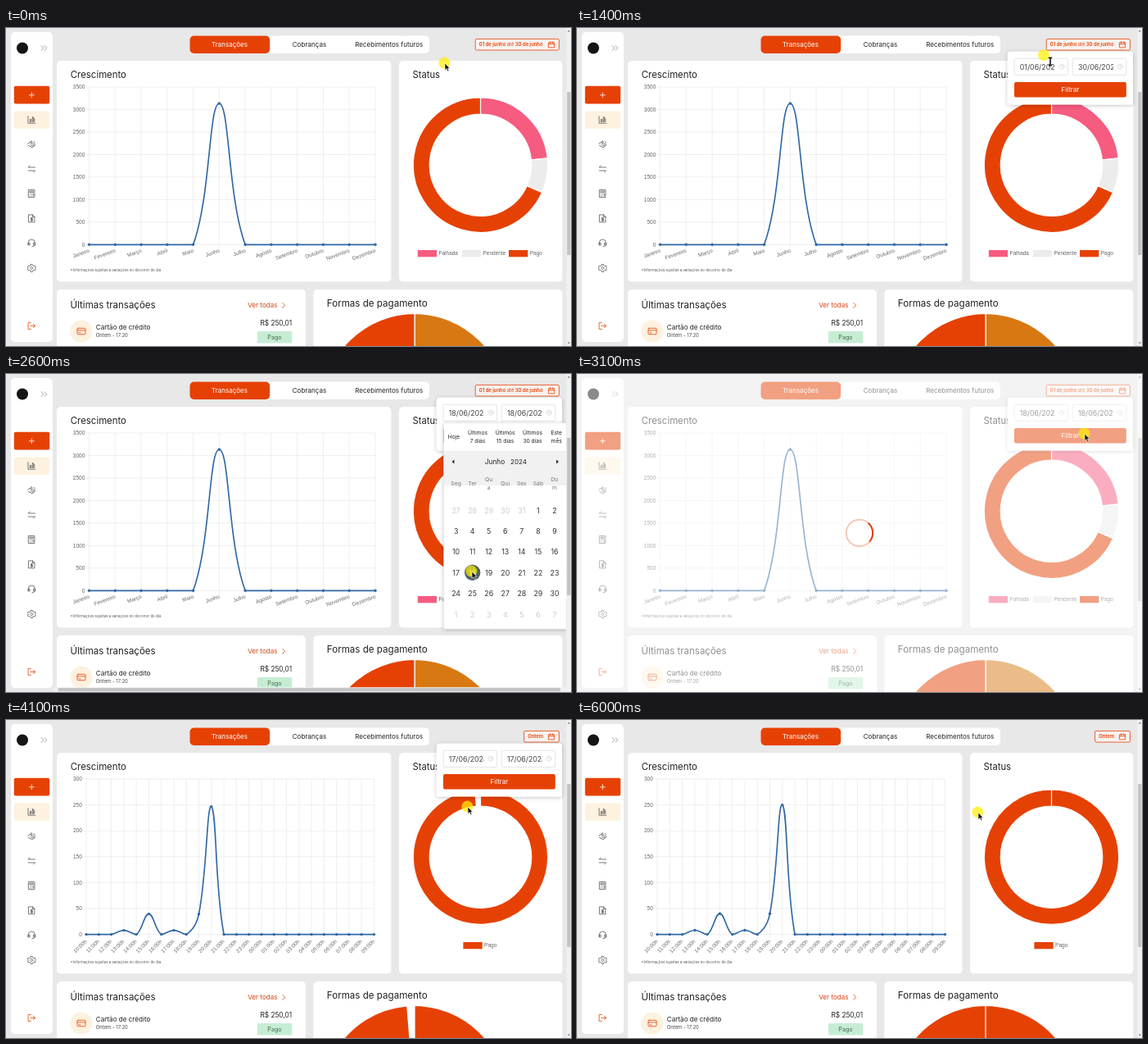
Write an HTML page that moves like this. It is 690 px wide and 388 px high and loops after 6.4 s.

```html
<!DOCTYPE html>
<html lang="pt-BR">
<head>
<meta charset="utf-8">
<title>Painel</title>
<style>
html, body { margin: 0; width: 100%; height: 100%; overflow: hidden; background: #e8e8e8; }
svg { display: block; width: 100vw; height: 100vh; font-family: Inter, sans-serif; }
.chart text { font: 6.5px "Liberation Sans", Arial, sans-serif; fill: #666; }
.icon { fill: none; stroke: #565656; stroke-width: .8; stroke-linecap: round; stroke-linejoin: round; }
.grid { fill: none; stroke: #e4e4e4; stroke-width: .6; }
.line { fill: none; stroke: #3168a5; stroke-width: 1.65; stroke-linejoin: round; }
</style>
</head>
<body>
<svg id="stage" viewBox="0 0 690 388"></svg>
<script>
const LOOP = 6400, STEP = 100;
const ORANGE = '#e64104', DARK = '#222', CREAM = '#fdf1df';

// ---------- drawing helpers ----------
const box = (x, y, x2, y2, fill, r = 0, more = '') =>
  `<rect x="${x}" y="${y}" width="${x2 - x}" height="${y2 - y}" rx="${r}" fill="${fill}" ${more}/>`;
const text = (x, y, size, str, fill = DARK, anchor = 'start', more = '') =>
  `<text x="${x}" y="${y}" font-size="${size}" fill="${fill}" text-anchor="${anchor}" ${more}>${str}</text>`;
const circle = (x, y, r, fill, more = '') => `<circle cx="${x}" cy="${y}" r="${r}" fill="${fill}" ${more}/>`;
const group = (id, body, more = '') => `<g id="${id}" ${more}>${body}</g>`;
const icon = (x, y, d, color = '#565656') =>
  `<path class="icon" transform="translate(${x} ${y})" style="stroke:${color}" d="${d}"/>`;
const at = id => document.getElementById(id);
const show = (id, on) => { at(id).style.display = on ? '' : 'none'; };

function slice(cx, cy, inner, outer, from, to) {
  const end = Math.min(to, from + .99999), big = end - from > .5 ? 1 : 0;
  const pt = (r, f) => {
    const a = (f - .25) * 2 * Math.PI;
    return `${(cx + r * Math.cos(a)).toFixed(3)} ${(cy + r * Math.sin(a)).toFixed(3)}`;
  };
  const back = inner ? `L${pt(inner, end)}A${inner} ${inner} 0 ${big} 0 ${pt(inner, from)}` : `L${cx} ${cy}`;
  return `M${pt(outer, from)}A${outer} ${outer} 0 ${big} 1 ${pt(outer, end)}${back}Z`;
}
const ringPath = (from, to) => slice(579.5, 167.2, 62.2, 82.2, from, to);
const piePath = (from, to) => slice(499, 461, 0, 112.5, from, to);
const wedge = (d, fill, id = '') => `<path id="${id}" d="${d}" fill="${fill}" stroke="#fff" stroke-width="1.2"/>`;

// Smooth curve through points, handles kept inside the plot area.
function spline(pts, top, bottom) {
  const clamp = y => Math.max(top, Math.min(bottom, y));
  const handles = pts.map((p, i) => {
    const a = pts[i - 1] || p, b = pts[i + 1] || p;
    const da = Math.hypot(p[0] - a[0], p[1] - a[1]), db = Math.hypot(b[0] - p[0], b[1] - p[1]);
    const ka = .4 * da / (da + db), kb = .4 * db / (da + db);
    const dx = b[0] - a[0], dy = b[1] - a[1];
    return [[p[0] - ka * dx, clamp(p[1] - ka * dy)], [p[0] + kb * dx, clamp(p[1] + kb * dy)]];
  });
  return pts.map((p, i) => i ? `C${handles[i - 1][1]} ${handles[i][0]} ${p}` : `M${p}`).join('');
}

// ---------- line charts ----------
const pad = n => String(n).padStart(2, '0');
const year = {
  left: 101.5, right: 451, top: 72, bottom: 264.3, max: 3500, tick: 500, tilt: -20,
  labels: ['Janeiro', 'Fevereiro', 'Março', 'Abril', 'Maio', 'Junho', 'Julho', 'Agosto',
    'Setembro', 'Outubro', 'Novembro', 'Dezembro'],
  values: [0, 0, 0, 0, 0, 3135, 0, 0, 0, 0, 0, 0]
};
const day = {
  left: 98, right: 449.5, top: 72, bottom: 261.6, max: 300, tick: 50, tilt: -45,
  labels: Array.from({ length: 24 }, (_, i) => pad((i + 10) % 24) + ':00h'),
  values: Array.from({ length: 24 }, (_, i) => ({ 3: 8, 5: 40, 7: 8, 9: 40, 10: 250 })[i] || 0)
};
const chartX = (c, i) => c.left + (c.right - c.left) * i / (c.labels.length - 1);
const chartY = (c, v) => c.bottom - (c.bottom - c.top) * v / c.max;
const chartPoints = (c, k) => c.values.map((v, i) => [+chartX(c, i).toFixed(2), +chartY(c, v * k).toFixed(2)]);

function axes(c) {
  let grid = '', labels = '';
  for (let v = 0; v <= c.max; v += c.tick) {
    const y = chartY(c, v);
    grid += `M${c.left - 4} ${y}H${c.right}`;
    labels += text(c.left - 5.2, y + 2.2, 6.5, v, '#666', 'end');
  }
  c.labels.forEach((name, i) => {
    const x = chartX(c, i);
    grid += `M${x} ${c.top}V${c.bottom + 4}`;
    labels += `<text text-anchor="end" transform="translate(${x + 1} ${c.bottom + 9}) rotate(${c.tilt})">${name}</text>`;
  });
  return `<path class="grid" d="${grid}"/>${labels}`;
}
const lineChart = (c, id) => axes(c) + `<path id="${id}Line" class="line"/>` +
  group(id + 'Dots', c.labels.map(() => circle(0, 0, 1.7, '#3168a5')).join(''));

function drawLine(c, id, k) {
  const pts = chartPoints(c, k), dots = at(id + 'Dots').children;
  at(id + 'Line').setAttribute('d', spline(pts, c.top, c.bottom));
  pts.forEach(([x, y], i) => { dots[i].setAttribute('cx', x); dots[i].setAttribute('cy', y); });
}

const legend = (x, name, color) => box(x, 271, x + 23.3, 279.3, color) + text(x + 25.7, 277.4, 6.5, name);

const monthView = lineChart(year, 'year') +
  wedge(ringPath(0, .234), '#f65b80') + wedge(ringPath(.234, .317), '#ececec') + wedge(ringPath(.317, 1), ORANGE) +
  legend(502.8, 'Falhada', '#f65b80') + legend(556.8, 'Pendente', '#ececec') + legend(614, 'Pago', ORANGE) +
  wedge(piePath(0, .5), '#d87813') + wedge(piePath(.5, 1), ORANGE);
const dayView = lineChart(day, 'day') + wedge('', ORANGE, 'ring') + wedge('', ORANGE, 'pie') +
  legend(558.4, 'Pago', ORANGE);

// ---------- page ----------
const calIcon = icon(666.2, 20.4, 'M-3.4 -2.6H3.4V3.4H-3.4ZM-3.4 -.5H3.4M-1.7 -3.7V-1.8M1.7 -3.7V-1.8', ORANGE);
const pill = (x, label) => box(x, 13.4, 675.4, 27, '#f7f3f1', 1.5, `stroke="${ORANGE}" stroke-width=".8"`) +
  text(x + 4.6, 22.3, 5.9, label, ORANGE, 'start', 'font-weight="600"') + calIcon;

const sidebar = box(6, 5, 57, 383, '#fff', 5) +
  circle(20, 24.5, 7, '#151515') +
  icon(46.5, 24.5, 'M-3.4 -2.8L-.6 0L-3.4 2.8M.6 -2.8L3.4 0L.6 2.8', '#888') +
  box(9.8, 70.8, 53.2, 92.6, ORANGE, 2) + icon(31.3, 81.8, 'M-3 0H3M0 -3V3', '#fff') +
  box(9.8, 101.4, 53.2, 122.8, CREAM, 2) +
  icon(31.3, 112, 'M-4.3 -4.3V4.2H4.5M-2 2.2V-.5H-.6V2.2ZM.9 2.2V-3.4H2V2.2ZM3.4 2.2V-1.8') +
  icon(31.3, 142, 'M-4.5 -1L-1.5 -2.6L1 -.4H3.6L4.4 .8L.8 3.8L-4 1.4M-1 .5L1 1.6H3M-.2 -4A1.3 1.3 0 1 1 -.3 -4M3 -3.5L4 -1.8') +
  icon(31.3, 172, 'M4.2 -2H-4.2L-2.2 -4M-4.2 2H4.2L2.2 4') +
  icon(31.3, 202, 'M-3.6 -4.5H3.6V4.5H-3.6ZM-2 -2.8H2V-1.2H-2ZM-2 .9H-1.8M0 .9H.2M2 .9H2.1M-2 2.8H-1.8M0 2.8H.2M2 .9V2.8') +
  icon(31.3, 232.4, 'M-3.5 -4.5H1.2L3.6 -2V4.5H-3.5ZM1.2 -4.5V-2H3.6M1.4 -.6H-1V1H1.2V2.6H-1.4M0 -1.2V3.2') +
  icon(31.3, 262.6, 'M-4 1.5V-.6A4 4 0 0 1 4 -.6V1.5M-4 -.3H-2.2V2.3H-4ZM4 -.3H2.2V2.3H4ZM4 2.3Q3.6 4.2 .6 4.2') +
  icon(31.3, 293, 'M-1 -4.6H1L1.4 -3.2L2.7 -2.5L4.1 -2.9L5 -1.2L4 0L5 1.2L4.1 2.9L2.7 2.5L1.4 3.2L1 4.6H-1L-1.4 3.2L-2.7 2.5L-4.1 2.9L-5 1.2L-4 0L-5 -1.2L-4.1 -2.9L-2.7 -2.5L-1.4 -3.2ZM1.5 0A1.5 1.5 0 1 1 1.5 -.1') +
  icon(31.3, 363.4, 'M-1 -4H-4.2V4H-1M-1.5 0H4.3M2 -2.3L4.3 0L2 2.3', ORANGE);

const page = box(0, 0, 690, 388, '#e8e8e8') + sidebar +
  box(224.5, 9.5, 517, 31, '#fff', 5) + box(224.5, 9.5, 322.2, 31, ORANGE, 5) +
  text(273, 23, 8, 'Transações', '#fff', 'middle') +
  text(370.5, 23, 8.1, 'Cobranças', DARK, 'middle') +
  text(467.8, 23, 8, 'Recebimentos futuros', DARK, 'middle') +
  box(62, 40, 470.4, 309.6, '#fff', 5) + box(480, 40, 679.4, 309.6, '#fff', 5) +
  box(62, 319, 366, 400, '#fff', 5) + box(375.4, 319, 679.4, 400, '#fff', 5) +
  text(78.8, 61.4, 11.4, 'Crescimento') + text(496.6, 61.4, 11.2, 'Status') +
  text(78.6, 342, 11.5, 'Últimas transações') + text(391.8, 340.2, 11.6, 'Formas de pagamento') +
  text(78.6, 297.2, 4.4, '*Informações sujeitas a variações no decorrer do dia', '#555') +
  text(295.2, 341, 8.1, 'Ver todas', '#d8420f') + icon(339.3, 338.3, 'M-1.6 -3L1.5 0L-1.6 3', '#d8420f') +
  circle(92, 370, 13.6, CREAM) +
  icon(92, 370, 'M-4 -3.7H4Q5 -3.7 5 -2.7V2.7Q5 3.7 4 3.7H-4Q-5 3.7 -5 2.7V-2.7Q-5 -3.7 -4 -3.7ZM-5 -1.1H5M-3 1.7H-1', ORANGE) +
  text(109.8, 368.3, 8.1, 'Cartão de crédito') + text(109.8, 377.2, 5.9, 'Ontem - 17:20', '#444') +
  text(349.2, 362.7, 8.3, 'R$ 250,01', DARK, 'end') +
  box(306.8, 370, 349.4, 384.4, '#c6edd4', 1.5) + text(328, 379.9, 7.2, 'Pago', '#3f6b52', 'middle');

const scrollV = box(684.4, 0, 690, 388, '#f1f1f1') + '<path d="M685.7 4.4L687.3 2.4L688.9 4.4Z" fill="#777"/>' +
  '<path id="downArrow" d="M685.7 383.6L687.3 385.6L688.9 383.6Z" fill="#777"/>' +
  `<rect id="thumb" x="685.2" y="78" width="4.2" fill="#c3c3c3"/>`;
const scrollH = box(58.5, 382.2, 690, 388, '#f1f1f1') + box(63.5, 383.1, 677, 387.2, '#c3c3c3');

// ---------- date filter ----------
const field = (x, id) => box(x, 37.2, x + 65.6, 57.4, '#fff', 1.5, 'stroke="#dedede" stroke-width=".8"') +
  `<clipPath id="${id}Clip"><rect x="${x}" y="38" width="49.8" height="18"/></clipPath>` +
  text(x + 6.8, 50.5, 8.8, '', '#444', 'start', `id="${id}" clip-path="url(#${id}Clip)"`) +
  icon(x + 58, 47.2, 'M3 0A3 3 0 1 1 3 -.1M0 -1.6V0H1.2', '#cfcfcf');
const popup = box(525.8, 28.8, 679, 93.6, '#fff', 3, 'filter="url(#shadow)"') +
  field(534, 'from') + field(605.2, 'to') +
  box(534, 66, 670.8, 84.6, ORANGE, 2) + text(602.4, 78.1, 8, 'Filtrar', '#fff', 'middle');

const mid = (x, y, size, str, fill) => text(x, y, size, str, fill, 'middle');
function calendarBody() {
  const colX = i => 549.6 + 20.06 * i;
  let out = box(534.6, 59.8, 684.4, 311, '#fff', 1, 'filter="url(#shadow)" stroke="#ddd" stroke-width=".5"') +
    box(534.8, 93.6, 684.2, 136, '#f1f1f1') + mid(547, 79.4, 6.7, 'Hoje');
  [[576, 'Últimos', '7 dias'], [609.6, 'Últimos', '15 dias'], [643, 'Últimos', '30 dias'], [672.2, 'Este', 'mês']]
    .forEach(([x, a, b]) => { out += mid(x, 74.3, 6.7, a) + mid(x, 84.2, 6.7, b); });
  out += text(584.8, 110, 8.3, 'Junho') + text(616, 110, 8, '2024') +
    '<path d="M547.4 104.6L544.6 107L547.4 109.4ZM672.2 104.6L675 107L672.2 109.4Z" fill="#222"/>';
  ['Seg', 'Ter', 'Qu a', 'Qui', 'Sex', 'Sáb', 'Do m'].forEach((name, i) => {
    const parts = name.split(' ');
    parts.forEach((s, j) => { out += mid(colX(i), parts.length > 1 ? 131 + 10 * j : 136, 6.8, s, '#777'); });
  });
  out += circle(colX(1), 242, 9, 'none', 'stroke="#999" stroke-width=".8"') + circle(0, 0, 9.6, '#4f626d', 'id="picked"');
  for (let i = 0; i < 42; i++) {
    const n = i - 4, inMonth = n >= 1 && n <= 30;
    const label = n < 1 ? n + 31 : n > 30 ? n - 30 : n;
    out += text(colX(i % 7), 169.5 + 25.4 * Math.floor(i / 7), 8.8, label,
      inMonth ? (n === 18 ? '#777' : '#333') : '#ccc', 'middle', `id="cell${n}"`);
  }
  return out;
}

// ---------- pointer ----------
const arrow = '<path d="M0 0V8.4L2 6.7L3.4 9.8L4.9 9.1L3.5 6.2H6Z" fill="#151515" stroke="#fff" stroke-width=".6"/>';
const hand = '<path d="M-.8 .6Q0 -.6 .8 .6V3.4L3.4 4.2Q4 4.8 3.6 6.4L2.8 9H-1.6L-3.6 5.6Q-3 4.4 -.8 5.8Z" fill="#222" stroke="#fff" stroke-width=".5"/>';
const beam = '<path d="M-2.2 -4.6H2.2M0 -4.6V4.6M-2.2 4.6H2.2" fill="none" stroke="#222" stroke-width="1.7"/>';

const spinner = circle(345, 194, 16.2, 'none', 'stroke="#f6c9b8" stroke-width="2"') +
  '<path id="arc" d="M356.46 182.54A16.2 16.2 0 0 1 356.46 205.46" fill="none" stroke="#dd3f0a" stroke-width="2"/>';

at('stage').innerHTML =
  `<defs><filter id="shadow" x="-10%" y="-10%" width="120%" height="125%">
  <feDropShadow dx="0" dy="1" stdDeviation="2.4" flood-opacity=".24"/></filter></defs>` +
  page + group('month', monthView, 'class="chart"') + group('hours', dayView, 'class="chart"') +
  group('range', pill(573.2, '01 de junho <tspan font-weight="400">até</tspan> 30 de junho')) +
  group('yesterday', pill(632.6, 'Ontem')) +
  group('popup', popup) + group('calendar', calendarBody()) + scrollV + group('scrollH', scrollH) +
  group('loading', box(0, 0, 690, 388, '#fff', 0, 'opacity=".5"') + spinner) +
  circle(0, 0, 7, '#fff000', 'id="halo"') +
  group('pointer', group('arrow', arrow) + group('hand', hand) + group('beam', beam));

// ---------- timeline ----------
// time, pointer x, pointer y
const path = [
  [0, 536, 43], [100, 539, 41], [200, 546, 37], [300, 546, 37], [400, 562, 31], [500, 588, 23], [600, 609, 19],
  [800, 614, 19], [1000, 614, 19], [1200, 602, 27], [1400, 578, 41], [1600, 567, 46], [1900, 564, 47],
  [2100, 564, 47], [2300, 567, 110], [2500, 569, 238], [2600, 569, 241], [2700, 590, 160], [2800, 614, 86],
  [2900, 614, 86], [3000, 619, 75], [3100, 620, 73], [3600, 618, 74], [3800, 600, 88], [4000, 570, 104],
  [4100, 564, 106], [4400, 560, 109], [4600, 564, 80], [4800, 574, 32], [4900, 577, 22], [5000, 576, 23],
  [5100, 562, 42], [5200, 532, 78], [5300, 500, 106], [5400, 490, 113], [LOOP, 490, 113]
];
const inside = (t, a, b) => t >= a && t < b;

function pointerAt(t) {
  const i = path.findIndex(p => p[0] > t), a = path[i - 1], b = path[i];
  const k = (t - a[0]) / (b[0] - a[0]);
  return [a[1] + (b[1] - a[1]) * k, a[2] + (b[2] - a[2]) * k];
}

function render(t) {
  const done = t >= 3700, calendar = inside(t, 1500, 2700), loading = inside(t, 3000, 3700);
  show('month', !done);
  show('hours', done);
  show('range', !done);
  show('yesterday', done);
  show('popup', inside(t, 700, 4500));
  show('calendar', calendar);
  show('scrollH', calendar);
  show('loading', loading);
  show('downArrow', !calendar);
  at('thumb').setAttribute('height', calendar ? 192 : 199);

  const changed = t >= 2600;
  at('from').textContent = done ? '17/06/2024' : changed ? '18/06/2024' : '01/06/2024';
  at('to').textContent = done ? '17/06/2024' : changed ? '18/06/2024' : '30/06/2024';
  at('picked').setAttribute('cx', changed ? 569.7 : 649.9);
  at('picked').setAttribute('cy', changed ? 242.4 : 166.4);
  at('cell1').setAttribute('fill', changed ? '#333' : '#fff');
  at('cell18').setAttribute('fill', changed ? '#fff' : '#777');

  if (loading) at('arc').setAttribute('transform', `rotate(${(t - 3100) / 700 * 360 - 4} 345 194)`);
  if (done) {
    const k = 1 - (1 - Math.min(1, (t - 3650) / 680)) ** 4;
    drawLine(day, 'day', k);
    at('ring').setAttribute('d', ringPath(0, k));
    at('pie').setAttribute('d', piePath(0, k));
  }

  const [x, y] = pointerAt(t);
  const onPill = inside(t, 600, 1100), onField = inside(t, 1400, 2200);
  const press = inside(t, 700, 900) || t === 2500;
  show('hand', onPill);
  show('beam', onField);
  show('arrow', !onPill && !onField);
  at('pointer').setAttribute('transform', `translate(${x} ${y})`);
  const halo = at('halo');
  halo.setAttribute('cx', x - (onPill ? 5 : onField ? 8 : .6));
  halo.setAttribute('cy', y - (onPill ? 1 : onField ? 8 : .4));
  halo.setAttribute('r', press ? 10 : 7);
  halo.setAttribute('fill', press ? '#ffb30a' : '#ffee00');
  halo.setAttribute('opacity', press ? .85 : .72);
}

drawLine(year, 'year', 1);
const start = performance.now();
let last = -1;
function tick() {
  const t = Math.floor((performance.now() - start) % LOOP / STEP) * STEP;
  if (t !== last) render(last = t);
  requestAnimationFrame(tick);
}
tick();
</script>
</body>
</html>
```
